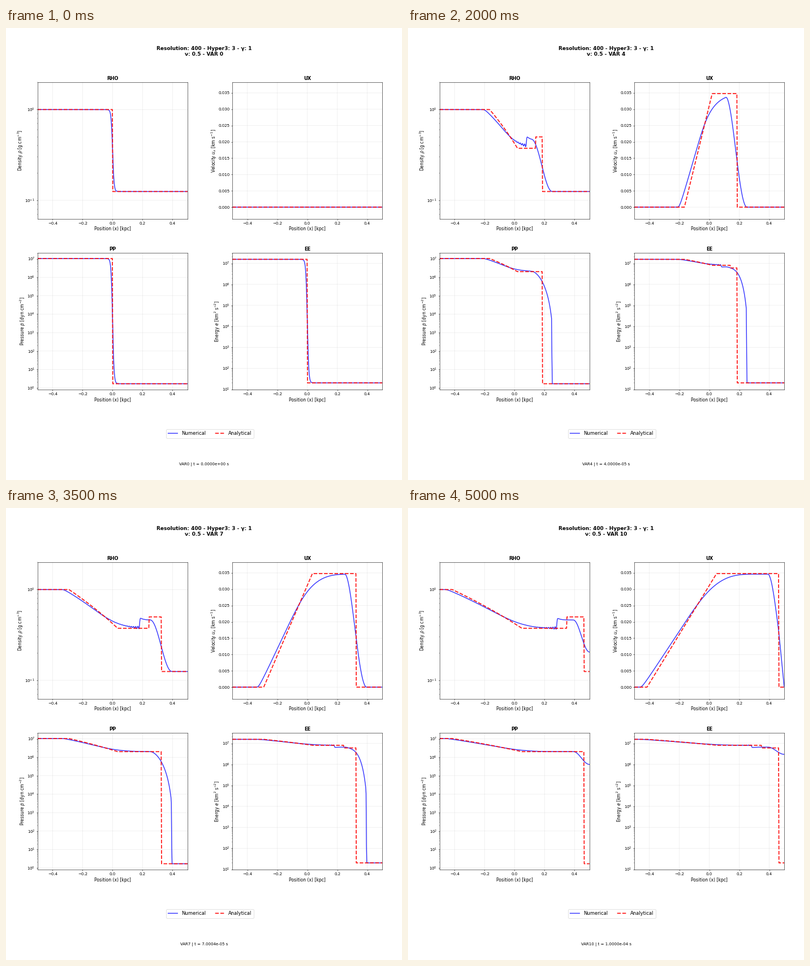
Recreate the animation shown at these times as a matplotlib script. Size 700 by 800 pixels, loop 5.5 s.

```python
import numpy as np
import matplotlib.pyplot as plt
from matplotlib.animation import FuncAnimation

# Shock tube states (gamma = 5/3); one time unit is the full run
G = 5 / 3
RHO_L, RHO_R = 1.0, 0.125
P_L, P_R = 1.0367e7, 1.69
C_L = np.sqrt(G * P_L / RHO_L) * 1e-4
U_S = 0.348                       # contact speed
TO_KMS = 0.1

TIMES = ["0.0000e+00", "1.0001e-05", "2.0002e-05", "3.0002e-05",
         "4.0000e-05", "5.0003e-05", "6.0005e-05", "7.0004e-05",
         "8.0003e-05", "9.0003e-05", "1.0000e-04"]
X = np.linspace(-0.5, 0.5, 400)


def energy(rho, p):
    return 1.5 * p / rho


def analytical(t):
    """Exact Riemann solution."""
    if t == 0:
        left = X < 0
        rho = np.where(left, RHO_L, RHO_R)
        p = np.where(left, P_L, P_R)
        return rho, 0 * X, p, energy(rho, p)
    u = np.clip(0.75 * (C_L + X / t), 0, U_S)
    rho = (1 - u / (3 * C_L)) ** 3
    p = P_L * rho ** G
    rho = np.where(X > U_S * t, 4 * RHO_R, rho)
    ahead = X > 4 / 3 * U_S * t
    u = np.where(ahead, 0, u)
    rho = np.where(ahead, RHO_R, rho)
    p = np.where(ahead, P_R, p)
    return rho, u * TO_KMS, p, energy(rho, p)


def fall(x, top, foot, warp=1.0):
    """Half cosine from 1 at top to 0 at foot."""
    s = np.clip((x - top) / (foot - top), 0, 1) ** warp
    return 0.5 * (1 + np.cos(np.pi * s))


def fan(x, t):
    """Velocity in the smeared rarefaction."""
    q = np.concatenate([np.geomspace(1e-4, 0.1, 60),
                        np.linspace(0.101, 0.9, 200),
                        0.996 - np.geomspace(0.095, 0.001, 120)])
    start = (-0.024 + 0.024 * q + 0.003 * np.log(q)
             - 0.034 * q**6 * np.log(1 - q / 0.996))
    pos = start + (4 / 3 * q * U_S - C_L) * t
    return U_S * np.interp(x, pos, q, left=0)


def numerical(t):
    """Diffusive solution: smeared fan, ringing contact and wide shock."""
    if t == 0:
        w = 0.5 * (1 + np.tanh(X / 0.01))
        rho = RHO_L * (RHO_R / RHO_L) ** w
        p = P_L * (P_R / P_L) ** w
        return rho, 0 * X, p, energy(rho, p)

    top = 0.47 * t - 0.078 + 0.05 * np.exp(-t / 0.12)
    front = 0.054 + 0.483 * t
    foot = front + 0.004
    contact = 0.339 * t - 0.056
    wall = foot > 0.5

    base = fan(np.minimum(X, top), t)
    u = base * fall(X, top, foot, 0.93)
    u = u - u[-1] * np.clip((X - 0.46) / 0.04, 0, 1) ** 1.5

    iso = (1 - base / (3 * C_L)) ** 3
    d = X - contact
    ring = -0.02 * np.cos(2 * np.pi * (d + 0.005) / 0.0145)
    behind = np.log10(iso) + ring * np.exp(np.minimum(d, 0) / 0.045)
    peak = 0.489 + 0.253 * np.exp(-t / 0.17)
    decay = np.exp((contact - np.clip(X, contact, max(top, contact))) / 0.02)
    hump = np.log10(0.462 + (peak - 0.462) * decay)
    end = np.log10(0.205 if wall else RHO_R)
    hump = end + (hump - end) * fall(X, top, min(foot, 0.5))
    mix = 0.5 * (1 + np.tanh(d / 0.003))
    rho = 10 ** (behind * (1 - mix) + hump * mix)

    lp = np.log10(P_L * iso ** G)
    if wall:
        end = np.log10(4.1e5)
        lp = end + (lp - end) * fall(X, top, 0.5)
    else:
        f = fall(X, top, front + 0.02, 0.85)
        lp = lp + 1.7 * np.log10(np.maximum(f, 1e-6))
        lp = lp - 900 * np.maximum(X - front, 0)
        lp = np.maximum(lp, np.log10(P_R))
    p = 10 ** lp
    return rho, u * TO_KMS, p, energy(rho, p)


U_MAX = U_S * TO_KMS
E_L, E_R = energy(RHO_L, P_L), energy(RHO_R, P_R)
# title, y label, label distance from the axis in pixels, y limits
PANELS = [
    ("RHO", r"Density $\rho$ [g cm$^{-3}$]", 30, (RHO_R / 2, RHO_L * 2)),
    ("UX", r"Velocity $u_x$ [km s$^{-1}$]", 32.7,
     (-0.103 * U_MAX, 1.1 * U_MAX)),
    ("PP", r"Pressure $p$ [dyn cm$^{-2}$]", 26, (0.48 * P_R, P_L * 2)),
    ("EE", r"Energy $e$ [km$^2$ s$^{-2}$]", 26, (0.48 * E_R, E_L * 2)),
]

fig, axes = plt.subplots(2, 2, figsize=(14, 16), dpi=50)
fig.subplots_adjust(left=0.08, right=0.95, top=0.88, bottom=0.2,
                    hspace=0.25, wspace=0.3)
num_lines, ana_lines = [], []
for ax, (name, label, gap, ylim) in zip(axes.flat, PANELS):
    if name != "UX":
        ax.set_yscale("log")
    num_lines += ax.plot(X, np.ones_like(X), "b-", lw=2, alpha=0.8,
                         snap=False, label="Numerical")
    ana_lines += ax.plot(X, np.ones_like(X), "r--", lw=2.5, alpha=0.9,
                         snap=False, label="Analytical")
    ax.set_xlim(-0.5, 0.5)
    ax.set_ylim(*ylim)
    ax.set_title(name, fontsize=12, fontweight="bold")
    ax.set_xlabel("Position (x) [kpc]", fontsize=11)
    ax.set_ylabel(label, fontsize=11, va="center")
    ax.yaxis.set_label_coords(-gap / ax.bbox.width, 0.5)
    ax.grid(True, alpha=0.3)
    for line in ax.get_xgridlines() + ax.get_ygridlines():
        line.set_snap(False)

legend = fig.legend(handles=[num_lines[0], ana_lines[0]], loc="center",
                    ncol=2, bbox_to_anchor=(0.515, 0.1028), fontsize=12)
for line in legend.get_lines():
    line.set_snap(False)
title = fig.suptitle("", y=0.9606, fontsize=13, fontweight="bold")
clock = fig.text(0.5, 0.03, "", ha="center", va="bottom", fontsize=10)


def update(i):
    t = i / 10
    for lines, state in ((num_lines, numerical(t)), (ana_lines, analytical(t))):
        for line, y in zip(lines, state):
            line.set_ydata(y)
    title.set_text("Resolution: 400 - Hyper3: 3 - γ: 1\n"
                   f"ν: 0.5 - VAR {i}")
    clock.set_text(f"VAR{i} | t = {TIMES[i]} s")
    return [*num_lines, *ana_lines, title, clock]


anim = FuncAnimation(fig, update, frames=len(TIMES), interval=500,
                     repeat=True, repeat_delay=0, blit=False)
plt.show()
```
